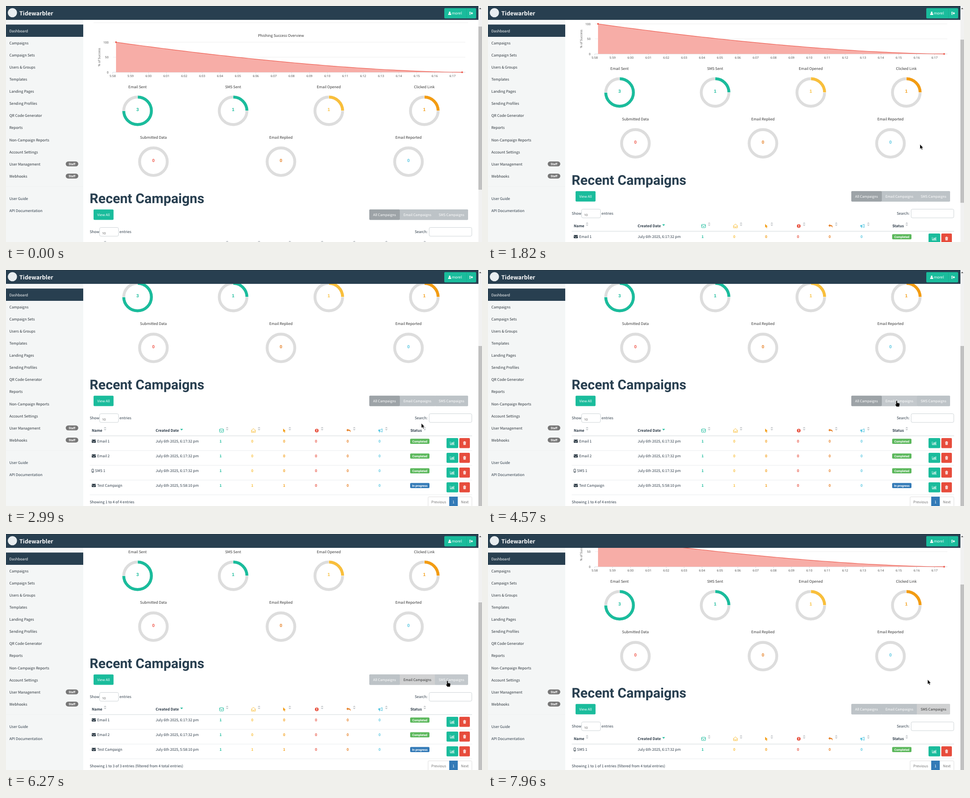
An HTML page for the animation above (8000 ms loop, 1060 by 528 pixels).

```html
<!DOCTYPE html>
<html lang="en">
<head>
<meta charset="utf-8">
<title>Campaign dashboard</title>
<style>
  html, body { margin: 0; width: 100%; height: 100%; overflow: hidden; background: #fff; }
  svg { display: block; width: 1060px; height: 528px; }
  text {
    font: 8.16px "Noto Sans CJK SC", "Noto Sans CJK JP", "Noto Sans CJK", "Open Sans", sans-serif;
    fill: #2c3a47; text-rendering: geometricPrecision; white-space: pre;
  }
  .mid { text-anchor: middle; }
  .end { text-anchor: end; }
  .bold { font-weight: 700; }
  .btn { font-size: 7.7px; }
  .axis { font: 6.9px "Noto Sans", sans-serif; fill: #555; }
  .total { font: 700 10px "Liberation Sans", Arial, sans-serif; }
  .tag { font: 700 6.84px Roboto, sans-serif; }
  .title { font: 700 30.2px Roboto, sans-serif; fill: #283f50; }
  .brand { font-size: 12.5px; font-weight: 700; }
</style>
</head>
<body>
<svg id="stage" viewBox="0 0 1060 528" xmlns="http://www.w3.org/2000/svg"></svg>
<script>
const NAVY = '#283f50', TEAL = '#1abc9c', AMBER = '#f9bf3b', ORANGE = '#f39c12',
      RED = '#e74c3c', RUST = '#e67e22', CYAN = '#5bc8e2', GREY = '#ddd', WHITE = '#fff';

// Markup helpers
const text = (x, y, str, cls = '', fill = '') =>
  `<text x="${x}" y="${y}" class="${cls}"${fill && ` style="fill:${fill}"`}>${str}</text>`;
const box = (x, y, w, h, fill, r = 0, extra = '') =>
  `<rect x="${x}" y="${y}" width="${w}" height="${h}" rx="${r}" fill="${fill}" ${extra}/>`;
const path = (d, fill, extra = '') => `<path d="${d}" fill="${fill}" ${extra}/>`;
const line = (d, color, w = 1) => path(d, 'none', `stroke="${color}" stroke-width="${w}"`);
const at = (x, y, body, id = '') => `<g ${id && `id="${id}"`} transform="translate(${x} ${y})">${body}</g>`;
const field = (x, y, w) => box(x, y, w, 19.5, WHITE, 3, 'stroke="#c8ced2" stroke-width=".9"');

// Icons are drawn around their own centre
const icons = {
  mail: c => box(-4.6, -3.5, 9.2, 7, c, 1) + line('M-4.6-2L0 1.6L4.6-2', WHITE, .9),
  mailLine: c => box(-4.5, -3.6, 9, 7.2, 'none', 1, `stroke="${c}"`) + line('M-4.3-2L0 1.4L4.3-2', c),
  mailOpen: c => line('M-4.3-1L0-4.5L4.3-1V4H-4.3ZM-4.3 0L0 2.6L4.3 0', c),
  phone: c => box(-1.9, -3.6, 3.8, 7.4, 'none', .8, `stroke="${c}" stroke-width=".9"`) + line('M-1.6 2.6H1.6', c, .8),
  pointer: c => path('M-2.8-4.6V3.2L-1 1.7L.3 4.7L1.7 4.1L.5 1.2H3Z', c),
  alert: c => `<circle r="4.1" fill="${c}"/>` + box(-.7, -2.7, 1.4, 3.3, WHITE) + box(-.7, 1.2, 1.4, 1.4, WHITE),
  reply: c => path('M-5-1L-1.4-4.2V-2.3C4-2.3 5.6.4 3.2 4.2C3.8 1 2.4.3-1.4.3V2.2Z', c),
  horn: c => line('M-4.2-1.6V1H-1L3.4 3.3V-4L-1-1.6Z', c) + path('M-4.5-2H-.8V1.3H-1.8L-.8 4.2H-2.4L-3.4 1.3H-4.5ZM3-4.4H4.2V3.8H3Z', c),
  bars: c => line('M-4.8-3.6V3.5H5', c, .8) + [2, 5, 4, 6].map((h, i) => box(-3.4 + i * 2, 2.6 - h, 1.2, h, c)).join(''),
  bin: c => path('M-3.4-2.7H3.4V-1.8H-3.4ZM-1.4-4H1.4V-2.7H-1.4ZM-2.7-1.3H2.7L2.4 4H-2.4Z', c)
    + line('M-1-.3V3M1-.3V3', RED, .6),
  user: c => `<circle cy="-1.9" r="1.9" fill="${c}"/>` + path('M-3.2 3.6V2Q-3.2 0-1 0H1Q3.2 0 3.2 2V3.6Z', c),
  exit: c => line('M-1-2.7H-3.4V2.7H-1', c, 1.1) + path('M-1.8-1H.8V-3L4 0L.8 3V1H-1.8Z', c),
};
const icon = (name, x, y, color) => at(x, y, icons[name](color));
const sorter = x => path(`M${x - 3} 528L${x} 525L${x + 3} 528ZM${x - 3} 530H${x + 3}L${x} 533Z`, '#c3c7ca');

function chart() {
  const x0 = 245, x1 = 1015.7, base = 148.3, top = 81;
  const curve = Array.from({ length: 61 }, (_, i) => {
    const u = i / 60;
    return `${(x0 + (x1 - x0) * u).toFixed(1)} ${(base - (base - top) * (1 - u) ** 1.6).toFixed(2)}`;
  }).join('L');
  let out = text(612.3, 69, 'Phishing Success Overview', 'mid', '#333');
  [100, 50, 0].forEach((v, i) => {
    const y = 81 + i * 33.6;
    out += line(`M238 ${y}H1023`, i < 2 ? '#e9e9e9' : '#ccd3dc', .8) + text(228.5, y + 2.5, v, 'axis end');
  });
  for (let i = 0; i < 20; i++) {
    const x = 237.6 + i * 39.83, min = (58 + i) % 60;
    out += line(`M${x} 148V152`, '#ccd3dc', .7)
      + text(x, 158.8, `${i < 2 ? 5 : 6}:${String(min).padStart(2, '0')}`, 'axis mid');
  }
  out += `<g transform="translate(209.6 114.5) rotate(-90)">${text(0, 0, '% of Success', 'axis mid')}</g>`;
  out += path(`M${x0} ${base}L${curve}Z`, '#f7ada7') + line(`M${curve}`, '#ee5f53', 1.2);
  return out + [[x0, top], [x1, base]].map(([x, y]) => `<circle cx="${x}" cy="${y}" r="2" fill="#ee5f53"/>`).join('');
}

function donut(x, y, label, value, share, color) {
  const r = 30.8, len = 2 * Math.PI * r;
  const ring = (c, dash) => `<circle cx="${x}" cy="${y}" r="${r}" fill="none" stroke="${c}" stroke-width="6.4" `
    + `stroke-dasharray="${dash}" transform="rotate(-90 ${x} ${y})"/>`;
  let out = text(x, y - 51, label, 'mid', '#333') + ring(GREY, `${len} 0`);
  if (share) {
    const a = 2 * Math.PI * share, p = k => `${x + k * Math.sin(a)} ${y - k * Math.cos(a)}`;
    out += ring(color, `${len * share} ${len}`)
      + line(`M${x} ${y - 27}V${y - 35}M${p(27)}L${p(35)}`, WHITE, .8);
  }
  return out + text(x, y + .6, value, 'total mid', color);
}

const tabs = [['All Campaigns', 809, 877], ['Email Campaigns', 877, 955], ['SMS Campaigns', 955, 1029]];
const columns = [
  ['mailLine', 480, 478, 492.5, TEAL], ['mailOpen', 551, 548.5, 563.5, AMBER], ['pointer', 620, 619.5, 632, ORANGE],
  ['alert', 692, 690.3, 704, '#e8513f'], ['reply', 763, 761, 775.5, RUST], ['horn', 834, 832, 847, CYAN],
];
const rows = [
  { name: 'Email 1', counts: [1, 0, 0, 0, 0, 0] },
  { name: 'Email 2', counts: [1, 0, 0, 0, 0, 0] },
  { name: 'SMS 1', sms: true, counts: [1, 0, 0, 0, 0, 0] },
  { name: 'Test Campaign', open: true, counts: [1, 1, 1, 0, 0, 0] },
];

function rowMarkup(row, i) {
  const body = icon(row.sms ? 'phone' : 'mail', row.sms ? 193.2 : 195.5, 0, '#26343f')
    + text(row.sms ? 198.3 : 203, 3.2, row.name)
    + text(333.3, 3.2, `July 6th 2025, ${row.open ? '5:58:10' : '6:17:32'} pm`)
    + row.counts.map((n, k) => text(columns[k][2], 3.2, n, 'bold mid', columns[k][4])).join('')
    + box(900, -5.5, 43, 11.5, row.open ? '#337ab7' : '#5cb85c', 2)
    + text(921.5, 2.7, row.open ? 'In progress' : 'Completed', 'tag mid', WHITE)
    + box(981, -7, 26, 22.5, TEAL, 2) + icon('bars', 994, 4.5, WHITE)
    + box(1009.5, -7, 23.5, 22.5, RED, 2) + icon('bin', 1021.2, 4.3, WHITE)
    + line('M186.5 21H1038', '#e8ebed');
  return at(0, 0, body, `row${i}`);
}

function content() {
  const head = line('M195 37.5H1029', '#eee') + chart()
    + donut(293, 234.5, 'Email Sent', 3, .75, TEAL) + donut(505.7, 234.5, 'SMS Sent', 1, .25, TEAL)
    + donut(718.8, 234.5, 'Email Opened', 1, .25, AMBER) + donut(931.5, 234.5, 'Clicked Link', 1, .25, ORANGE)
    + donut(328.3, 348.3, 'Submitted Data', 0, 0, '#f05b4f') + donut(612.3, 348.3, 'Email Replied', 0, 0, RUST)
    + donut(896.3, 348.3, 'Email Reported', 0, 0, CYAN)
    + text(186.3, 441, 'Recent Campaigns', 'title')
    + box(195, 455.3, 44.5, 23.2, TEAL, 2) + text(217.2, 470, 'View All', 'btn mid', WHITE)
    + box(809, 455.3, 220, 23.2, '#bdc3c7', 2)
    + tabs.map(([s, a, b], i) => box(a, 455.3, b - a, 23.2, '#bdc3c7', i === 1 ? 0 : 2, `id="tab${i}"`)
      + `<text id="label${i}" class="btn mid" x="${(a + b) / 2}" y="470">${s}</text>`).join('');
  const table = text(186.5, 508, 'Show') + field(208.5, 495.5, 42) + text(214, 511.3, '10', 'axis')
    + text(252.7, 508, 'entries') + text(938.5, 508, 'Search:', 'end') + field(942.3, 495.5, 95)
    + text(191, 536.3, 'Name', 'bold') + text(333.3, 536.3, 'Created Date', 'bold') + text(900.5, 536.3, 'Status', 'bold')
    + sorter(220.7) + sorter(932.5) + path('M388 529.5H394.2L391.1 533Z', TEAL)
    + columns.map(([name, x, , s, c]) => icon(name, x, 533.3, c) + sorter(s)).join('')
    + line('M186.5 545H1038', '#dfe4e6', 1.4) + rows.map(rowMarkup).join('');
  const foot = `<text id="info" x="186.5" y="3.5"></text>`
    + box(940, -10.5, 97.5, 22, WHITE, 2, 'stroke="#ddd"') + box(987, -11, 19, 23, '#337ab7')
    + text(963.5, 3.5, 'Previous', 'mid', '#777') + text(996.5, 3.5, '1', 'mid', WHITE) + text(1021.7, 3.5, 'Next', 'mid', '#777');
  return head + table + at(0, 0, foot, 'foot');
}

function frame() {
  const links = ['Dashboard', 'Campaigns', 'Campaign Sets', 'Users &amp; Groups', 'Templates', 'Landing Pages',
    'Sending Profiles', 'QR Code Generator', 'Reports', 'Non-Campaign Reports', 'Account Settings',
    'User Management', 'Webhooks'];
  const pill = y => box(133, y - 5.5, 28, 11, '#777', 5.5) + text(147, y + 2.5, 'Staff', 'tag mid', WHITE);
  return box(0, 31, 172, 497, '#f4f6f6') + box(0, 41.5, 172, 27.5, NAVY)
    + links.map((s, i) => text(7.5, 59 + i * 27.06, s, '', i ? '#2b333a' : WHITE)).join('')
    + pill(353.3) + pill(380.4) + line('M0 403.5H172', '#eff1f1')
    + text(7.5, 434, 'User Guide') + text(7.5, 461, 'API Documentation')
    + box(0, 0, 1052, 31, NAVY) + box(0, 0, 1052, 1, '#1f303d')
    + `<circle cx="14.3" cy="15" r="10.3" fill="#e8edf0"/>` + text(29.8, 21, 'Tidewarbler', 'brand', WHITE)
    + box(976, 4.7, 71, 23, TEAL, 2) + line('M1025.5 4.7V27.7', '#18ad90', .8)
    + icon('user', 988, 16.3, WHITE) + text(992.8, 19.4, 'morel', '', WHITE) + icon('exit', 1036, 16.3, WHITE)
    + box(1052, 0, 8, 528, '#f1f1f1') + path('M1053.5 7L1056 4L1058.5 7Z', '#505050')
    + box(1052, 46, 8, 365, '#c1c1c1', 0, 'id="thumb"');
}

const $ = id => document.getElementById(id);
$('stage').innerHTML = box(0, 0, 1060, 528, WHITE) + at(0, 0, content(), 'page') + frame()
  + at(0, 0, path('M0 0V10.4L2.4 8.3L4 12L5.7 11.2L4.2 7.7H7.2Z', '#000', 'id="arrow" stroke="#fff" stroke-width=".5"')
    + path('M-1.2 1.2Q0-.8 1.2 1.2V5.2L5.4 6Q7 6.5 6.8 8.4L5.8 13.8H-.4L-3 9.6Q-3.4 7.6-1.2 8.6Z', '#000',
      'id="hand" stroke="#fff" stroke-width=".4"'), 'cursor');

// Timeline
const LOOP = 8000, EMAIL_AT = 5380, SMS_AT = 7070, FADE = 250;
const scrollSteps = [6, 20, 41, 80, 118, 152, 174];
const views = [
  { shown: [0, 1, 2, 3], scroll: 174, thumb: 170 },
  { shown: [0, 1, 3], scroll: 141, thumb: 153 },
  { shown: [2], scroll: 75, thumb: 113 },
];
const easeOut = p => 1 - (1 - p) ** 2, easeBoth = p => p * p * (3 - 2 * p);
// start, end, steps, target x, target y, easing
const moves = [
  [530, 1020, 8, 962, 309.5, easeOut],
  [2440, 2990, 8, 925, 343, easeBoth],
  [3190, 3940, 11, 909, 286, easeBoth],
  [4010, 4570, 9, 910, 292, easeBoth],
  [5380, 6130, 11, 981, 329, easeBoth],
  [6200, 6270, 2, 983, 328, easeBoth],
  [7550, 7690, 3, 981, 326.5, easeBoth],
  [7890, 7960, 2, 979, 325.7, easeBoth],
];

function cursorAt(t) {
  let x = 1048, y = 566;
  for (const [start, end, n, tx, ty, ease] of moves) {
    if (t < start) break;
    const step = Math.min(n, Math.floor((t - start) / ((end - start) / (n - 1)) + 1e-6) + 1);
    const p = ease(step / n);
    x += (tx - x) * p;
    y += (ty - y) * p;
  }
  return { x, y };
}

function scrollAt(t, view) {
  if (view) return views[view].scroll;
  return t < 1680 ? 0 : scrollSteps[Math.min(6, Math.floor((t - 1680) / 70))];
}

const mix = (a, b, p) => `rgb(${a.map((v, i) => Math.round(v + (b[i] - v) * p))})`;
const IDLE = [189, 195, 199], FIRST = [157, 163, 167], PICKED = [208, 209, 210], LIGHT = [255, 255, 255], DARK = [51, 51, 51];

function paintTabs(t, view, hover) {
  const p = Math.min(1, (t - (view === 2 ? SMS_AT : EMAIL_AT)) / FADE);
  tabs.forEach((_, i) => {
    const on = i ? PICKED : FIRST, ink = i ? DARK : LIGHT;
    const amount = i === view ? (view ? p : 1) : i === view - 1 ? 1 - p : 0;
    const rest = i === hover ? [195, 200, 204] : IDLE;
    $('tab' + i).setAttribute('fill', mix(rest, on, amount));
    $('label' + i).style.fill = mix(LIGHT, ink, amount);
  });
}

let lastView = -1;
function layout(view) {
  if (view === lastView) return;
  lastView = view;
  const { shown } = views[view], n = shown.length;
  rows.forEach((_, i) => {
    const k = shown.indexOf(i);
    $('row' + i).setAttribute('display', k < 0 ? 'none' : 'inline');
    $('row' + i).setAttribute('transform', `translate(0 ${557 + 33 * k})`);
  });
  $('foot').setAttribute('transform', `translate(0 ${560 + 33 * n})`);
  $('info').textContent = `Showing 1 to ${n} of ${n} entries` + (n < 4 ? ' (filtered from 4 total entries)' : '');
}

function draw(t) {
  const view = t < EMAIL_AT ? 0 : t < SMS_AT ? 1 : 2;
  const scroll = scrollAt(t, view), { x, y } = cursorAt(t);
  layout(view);
  $('page').setAttribute('transform', `translate(0 ${-scroll})`);
  const top = view ? views[view].thumb : 46 + scroll * 124 / 174;
  $('thumb').setAttribute('y', top);
  $('thumb').setAttribute('height', view ? 528 - top : 365);

  const inBar = y >= 455 - scroll && y <= 478.5 - scroll;
  const hover = inBar ? tabs.findIndex(([, a, b]) => x >= a && x < b) : -1;
  paintTabs(t, view, hover);
  $('cursor').setAttribute('display', t < 530 ? 'none' : 'inline');
  $('cursor').setAttribute('transform', `translate(${x} ${y})`);
  $('arrow').setAttribute('display', hover < 0 ? 'inline' : 'none');
  $('hand').setAttribute('display', hover < 0 ? 'none' : 'inline');
}

const begin = performance.now();
function tick() {
  draw((performance.now() - begin) % LOOP);
  requestAnimationFrame(tick);
}
tick();
</script>
</body>
</html>
```
